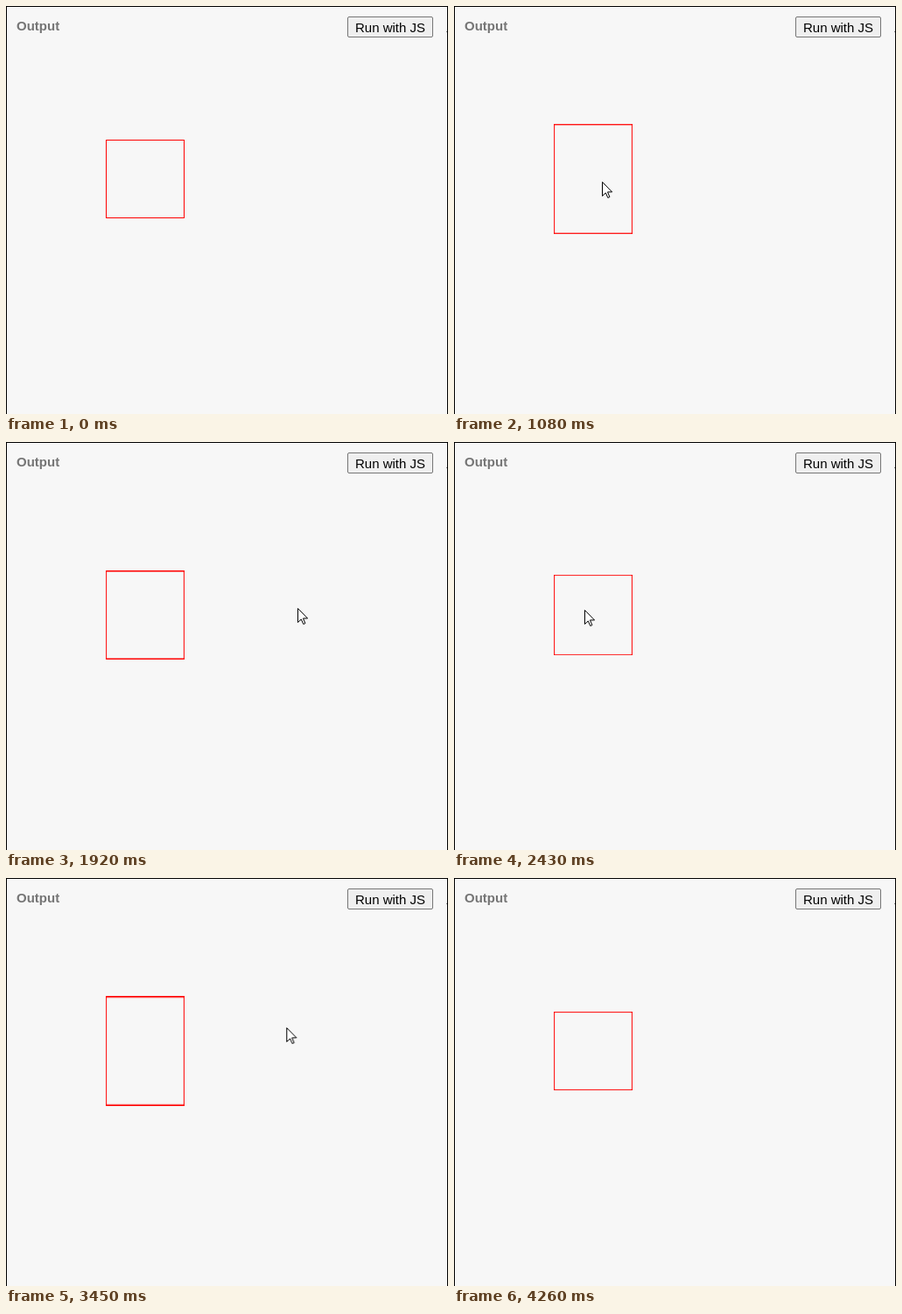
Animation of 505x467 px, one loop 4.62 s. Source, as an HTML page:

```html
<!DOCTYPE html>
<html lang="en">
<head>
<meta charset="utf-8">
<title>Hover stretch</title>
<style>
  html, body {
    margin: 0;
    width: 100%;
    height: 100%;
    overflow: hidden;
  }
  .stage {
    position: relative;
    box-sizing: border-box;
    width: 505px;
    height: 467px;
    overflow: hidden;
    border: solid #000;
    border-width: 1px 1px 0;
    background: #f7f7f7;
    font: 15px/17px "Liberation Sans", Arial, sans-serif;
  }
  /* Children are placed from the outer corner of the stage. */
  .stage > * {
    position: absolute;
    box-sizing: border-box;
    margin: -1px 0 0 -1px;
    white-space: nowrap;
  }
  .title {
    left: 12px;
    top: 14px;
    color: #757575;
    font-weight: bold;
  }
  .run {
    left: 390px;
    top: 12px;
    width: 98px;
    height: 24px;
    padding: 3px 8px;
    border: 1px solid #767676;
    border-radius: 2px;
    background: #efefef;
    color: #000;
  }
  .speck {
    left: 503px;
    top: 29px;
    width: 1px;
    height: 1px;
    background: #777;
  }
  .box {
    left: 114px;
    top: 153px;
    width: 90px;
    height: 90px;
    border: 1px solid #f00;
    animation: stretch 4620ms ease infinite;
  }
  .cursor {
    left: 0;
    top: 0;
    width: 13px;
    height: 20px;
    animation: move 4620ms linear infinite;
  }

  /* The box grows while the pointer is inside it and shrinks after it leaves. */
  @keyframes stretch {
    0%, 13.05% { transform: scaleY(1); }
    33.55% { transform: scaleY(1.5); }
    51.3% { transform: scaleY(1); }
    71.21% { transform: scaleY(1.5); }
    92.21%, 100% { transform: scaleY(1); }
  }
  @keyframes move {
    0%, 3.24% { transform: translate(520px, 65px); }
    3.25% { transform: translate(479px, 65px); }
    6.49% { transform: translate(380px, 120px); }
    9.74% { transform: translate(290px, 200px); }
    12.12% { transform: translate(225px, 243px); }
    13.05% { transform: translate(200px, 235px); }
    14.29%, 32.03% { transform: translate(169px, 201px); }
    32.9% { transform: translate(204px, 198px); }
    37.23%, 46.75% { transform: translate(333px, 190px); }
    49.35% { transform: translate(256px, 192px); }
    51.3% { transform: translate(204px, 192px); }
    52.6% { transform: translate(149px, 192px); }
    55.19%, 68.83% { transform: translate(133px, 192px); }
    71.21% { transform: translate(204px, 184px); }
    72.73% { transform: translate(280px, 176px); }
    74.68% { transform: translate(320px, 171px); }
    84.42% { transform: translate(476px, 150px); }
    86.36%, 100% { transform: translate(520px, 144px); }
  }
</style>
</head>
<body>
<div class="stage">
  <div class="title">Output</div>
  <div class="run">Run with JS</div>
  <div class="speck"></div>
  <div class="box"></div>
  <svg class="cursor" viewBox="0 0 13 20">
    <path d="M.5 .5V16.5L4.3 12.9L6.8 18.5L8.9 17.6L6.5 11.9H11.6Z" fill="#fff" stroke="#000"/>
  </svg>
</div>
</body>
</html>
```
